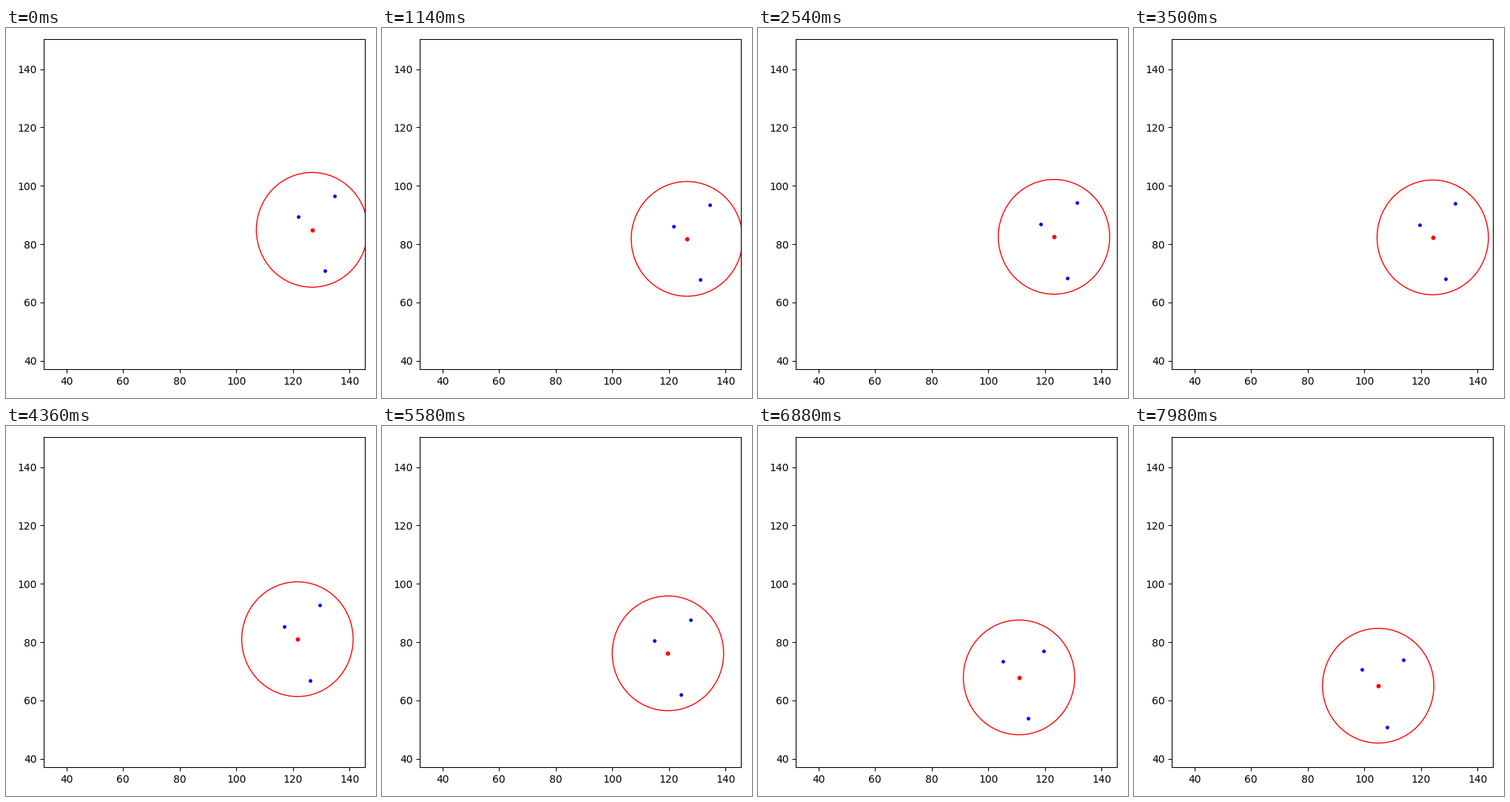
These frames come from a looping animation (500x500 px, 8 s). A matplotlib script:

```python
import numpy as np
import matplotlib.pyplot as plt
from matplotlib.animation import FuncAnimation
from matplotlib.patches import Circle

LOOP = 8000      # ms
TICK = 20        # ms
RADIUS = 19.67

# Turning points of the wandering centre: step and position
TURNS = np.array([0, 17, 25, 55, 70, 88, 95, 119, 148, 171])
TURN_X = np.array([126.75, 122.6, 126.35, 123.2, 125.0,
                   120.6, 121.65, 119.65, 110.85, 104.9])
TURN_Y = np.array([84.9, 80.6, 81.8, 82.5, 83.0,
                   79.3, 81.1, 76.15, 67.9, 65.05])

# Members relative to the centre, before and after the group regroups
LOOSE = np.array([(-4.75, 4.4), (8.0, 11.6), (4.6, -14.1)])
TIGHT = np.array([(-5.8, 5.5), (8.8, 8.8), (3.2, -14.1)])
REGROUP = 115, 155


def smooth(t, knots, values):
    """Cubic curve through the knots that does not overshoot."""
    h = np.diff(knots)
    d = np.diff(values) / h
    a, b = d[:-1], d[1:]
    inner = np.where(a * b > 0, 2 * a * b / (a + b), 0)
    m = np.concatenate((d[:1], inner, d[-1:]))
    i = np.clip(np.searchsorted(knots, t, side="right") - 1, 0, len(h) - 1)
    s = (t - knots[i]) / h[i]
    return ((1 + 2 * s) * (1 - s) ** 2 * values[i]
            + s * (1 - s) ** 2 * h[i] * m[i]
            + s * s * (3 - 2 * s) * values[i + 1]
            + s * s * (s - 1) * h[i] * m[i + 1])


def ease(t, start, end):
    s = np.clip((t - start) / (end - start), 0, 1)
    return s * s * (3 - 2 * s)


def step_at(ms):
    """Steps last 20, 100 and 20 ms in turn."""
    cycle, rest = divmod(ms, 140)
    return 3 * cycle + (rest >= 20) + (rest >= 120)


fig, ax = plt.subplots(figsize=(5, 5), dpi=100)
ax.set_xlim(32.0, 145.42)
ax.set_ylim(37.05, 150.3)
fig.tight_layout()

ring = ax.add_patch(Circle((0, 0), RADIUS, fill=False, edgecolor="red"))
blue, = ax.plot([], [], "b.", markersize=5)
red, = ax.plot([], [], "r.", markersize=6.5)


def update(frame):
    n = step_at(frame * TICK)
    centre = np.array([smooth(n, TURNS, v) for v in (TURN_X, TURN_Y)])
    members = centre + LOOSE + (TIGHT - LOOSE) * ease(n, *REGROUP)
    ring.center = centre
    red.set_data(centre[:1], centre[1:])
    blue.set_data(members[:, 0], members[:, 1])
    return ring, blue, red


anim = FuncAnimation(fig, update, frames=LOOP // TICK, interval=TICK,
                     repeat=True, repeat_delay=0)
plt.show()
```
